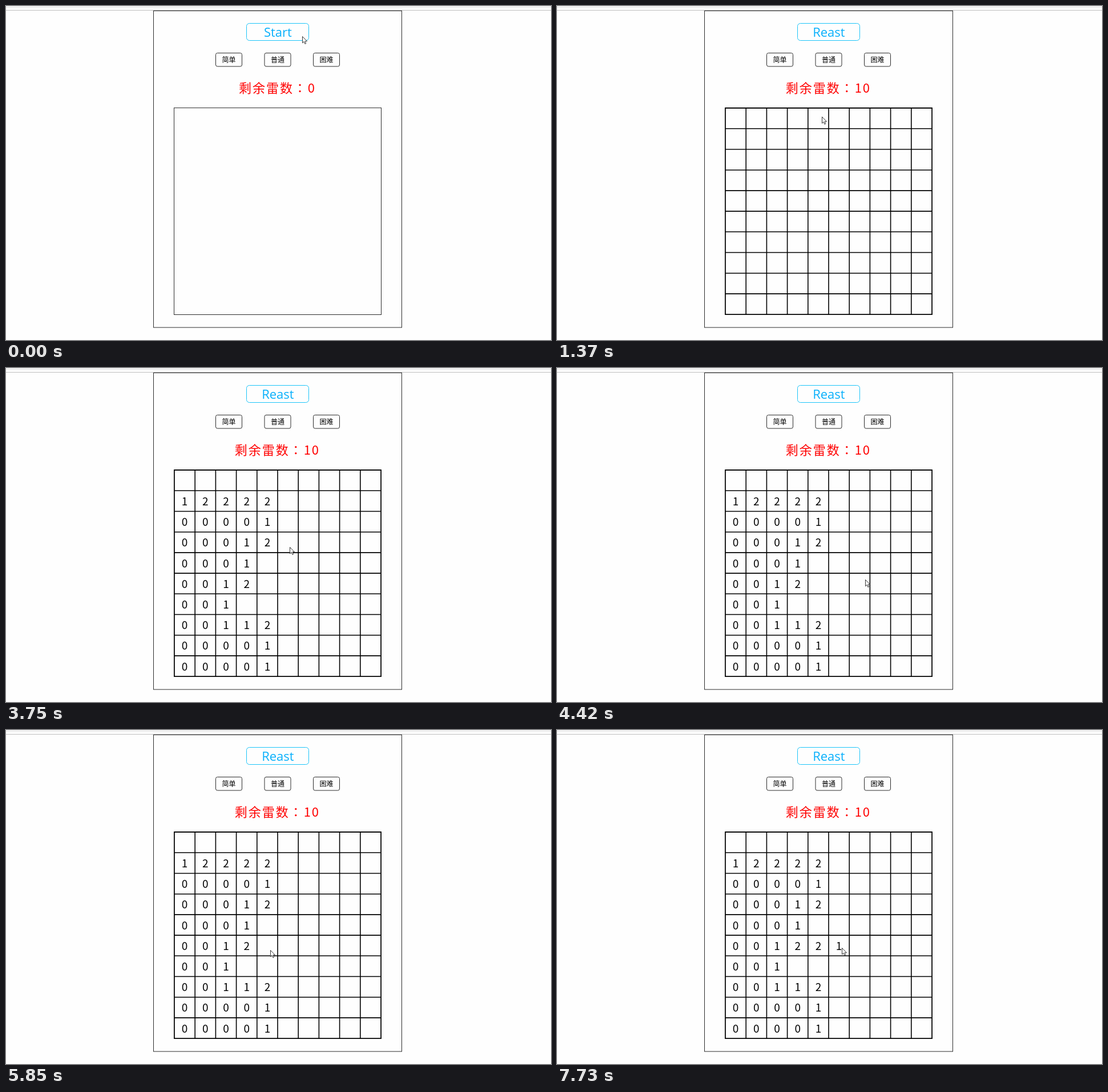
Recreate the animation shown at these times as an HTML page. Size 955 px wide and 586 px high, loop 8000 ms.

```html
<!DOCTYPE html>
<html lang="zh-CN">
<head>
<meta charset="utf-8">
<title>扫雷</title>
<style>
  html, body { margin: 0; width: 100%; height: 100%; overflow: hidden; background: #fefefe; }
  svg { display: block; width: 100%; height: 100%; }
  text { font-family: "Noto Sans CJK SC", "Noto Sans CJK", sans-serif; font-weight: 350; }
  .box { fill: none; stroke: #2c2c2c; }
  .mid { text-anchor: middle; }
  .level { font-size: 12px; }
  .digit { font-size: 19px; }
  #label { font: 22px "Open Sans", "Noto Sans", sans-serif; fill: #08b0fb; }
  #left { font-size: 22px; letter-spacing: 2px; fill: #f00; }
  .colon { font-family: "Noto Sans CJK TC", "Noto Sans CJK", sans-serif; }
</style>
</head>
<body>
<svg viewBox="0 0 955 586">
  <rect width="955" height="4" fill="#f1f1f1"/>
  <rect y="7" width="955" height="1" fill="#bdbdbd"/>
  <rect class="box" x="258.5" y="8.5" width="435" height="555.5"/>
  <rect x="421.5" y="30.5" width="109" height="30" rx="5" fill="none" stroke="#1cc4f8"/>
  <text id="label" class="mid" x="476.4" y="54"></text>
  <g id="levels"></g>
  <text id="left" y="152"><tspan>剩余雷数</tspan><tspan class="colon" lang="zh-Hant">：</tspan><tspan id="count" dx=".8"></tspan></text>
  <rect class="box" x="294.5" y="178.7" width="363" height="362.8"/>
  <path id="grid" stroke="#000" stroke-width="1.6"/>
  <g id="digits"></g>
  <path id="cursor" d="M.5.5V11.8L3.1 9.4 4.9 13.5 6.7 12.7 5 8.8H8.5Z" fill="#fff" stroke="#222" stroke-width=".9"/>
</svg>
<script>
const $ = id => document.getElementById(id);
const LOOP = 8000, START = 710, STEP = 130;
const SIZE = 10, LEFT = 295, TOP = 179.1, CELL = 36.2;

// row, column
const MINES = [[0, 1], [0, 2], [0, 4], [2, 5], [2, 8], [4, 4], [5, 8], [6, 3], [8, 5], [9, 8]];
// time, row, column
const CLICKS = [[2760, 2, 3], [6000, 5, 4], [7730, 5, 5]];
// Pointer moves: start time, number of even steps, end x, end y
const MOVES = [
  [0, 1, 519, 53], [1130, 3, 437, 265], [2460, 1, 435, 271], [3630, 2, 559, 357],
  [4180, 3, 531, 378], [5010, 2, 471, 397], [5440, 3, 463, 386],
  [6430, 2, 479, 401], [6710, 2, 499, 382]
];

function add(parent, tag, attrs, text = '') {
  const el = document.createElementNS('http://www.w3.org/2000/svg', tag);
  for (const key in attrs) el.setAttribute(key, attrs[key]);
  el.textContent = text;
  parent.append(el);
  return el;
}

['简单', '普通', '困难'].forEach((name, i) => {
  const x = 367.5 + 85.5 * i;
  add($('levels'), 'rect', { class: 'box', x, y: 82.5, width: 46, height: 23.5, rx: 3 });
  add($('levels'), 'text', { class: 'mid level', x: x + 23, y: 99.3 }, name);
});

let lines = '';
for (let i = 0; i <= SIZE; i++) {
  const x = LEFT + CELL * i, y = TOP + CELL * i;
  lines += `M${x} 178.3V542M294.2 ${y}H657.8`;
}
$('grid').setAttribute('d', lines);

// Opening a cell shows its mine count; a zero also opens its neighbours.
const opened = new Map();
function open(time, row, col) {
  const key = row * SIZE + col;
  if (Math.min(row, col) < 0 || Math.max(row, col) >= SIZE || opened.has(key)) return;
  const near = MINES.filter(([r, c]) => Math.abs(r - row) < 2 && Math.abs(c - col) < 2).length;
  const x = LEFT + CELL * (col + .5), y = TOP + CELL * (row + .71);
  opened.set(key, { time, el: add($('digits'), 'text', { class: 'mid digit', x, y }, near) });
  if (near) return;
  for (let r = row - 1; r <= row + 1; r++)
    for (let c = col - 1; c <= col + 1; c++) open(time, r, c);
}
CLICKS.forEach(click => open(...click));

function pointer(t) {
  let x = 0, y = 0;
  for (const [start, steps, endX, endY] of MOVES) {
    if (t < start) break;
    const p = Math.min(1, (Math.floor((t - start) / STEP) + 1) / steps);
    x += (endX - x) * p;
    y += (endY - y) * p;
  }
  return [Math.round(x), Math.round(y)];
}

const show = (el, on) => el.setAttribute('visibility', on ? 'visible' : 'hidden');

function draw(t) {
  const playing = t >= START;
  $('label').textContent = playing ? 'Reast' : 'Start';
  $('count').textContent = playing ? MINES.length : 0;
  $('left').setAttribute('x', playing ? 400.8 : 408);
  show($('grid'), playing);
  opened.forEach(d => show(d.el, t >= d.time));
  $('cursor').setAttribute('transform', `translate(${pointer(t)})`);
}

let begin;
function tick(now) {
  begin ??= now;
  draw(Math.max(0, now - begin) % LOOP);
  requestAnimationFrame(tick);
}
draw(0);
requestAnimationFrame(tick);
</script>
</body>
</html>
```
